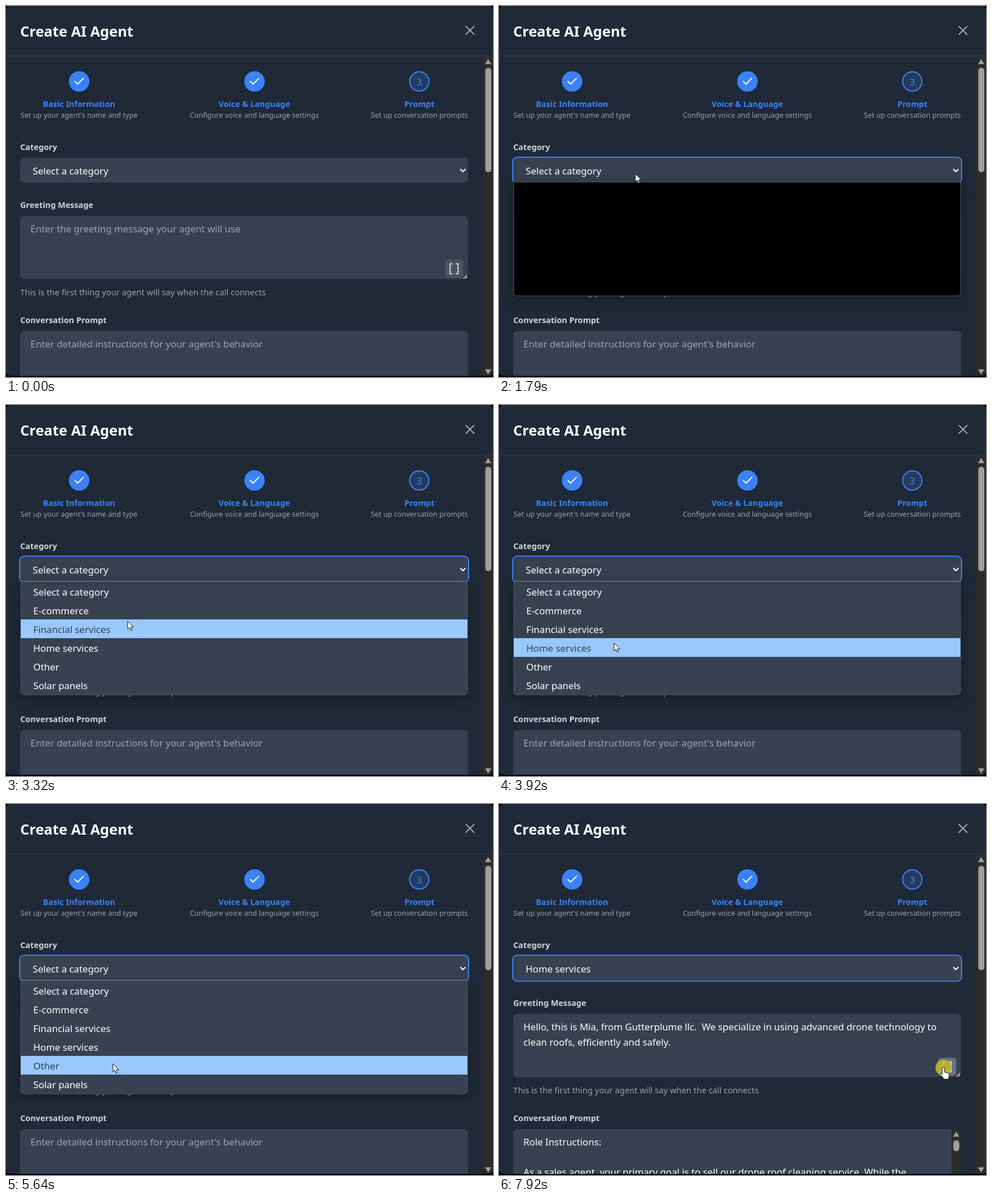
An HTML page that plays this animation: 857 by 654 pixels, repeating every 7990 ms.

```html
<!DOCTYPE html>
<html lang="en">
<head>
<meta charset="utf-8">
<title>Create AI Agent</title>
<style>
  html, body { margin: 0; width: 100%; height: 100%; overflow: hidden; background: #000; }
  svg { display: block; width: 857px; height: 654px; }
  text { font: 16.7px "Noto Sans", sans-serif; fill: #fff; }
  .mid { text-anchor: middle; }
  text.title { font-size: 25.2px; font-weight: 700; }
  text.step { font-size: 14.2px; font-weight: 600; fill: #3b82f6; }
  text.hint { font-size: 12.6px; fill: #9ca3af; }
  text.label { font-size: 14.3px; font-weight: 600; fill: #d1d5db; }
  text.help { font-size: 14.65px; fill: #9ca3af; }
  text.placeholder { fill: #9ca3af; }
  .field { fill: #374151; }
  .track { fill: #2c2c2c; }
  .thumb { fill: #9f9f9f; }
  .line { fill: none; stroke: #fff; stroke-width: 2; stroke-linecap: round; stroke-linejoin: round; }
  .blue { fill: #3b82f6; }
  #list { filter: drop-shadow(0 6px 10px rgba(0, 0, 0, .3)); }
</style>
</head>
<body>
<svg viewBox="0 0 857 654">
  <defs>
    <clipPath id="panel"><rect width="857" height="652" rx="8"/></clipPath>
    <clipPath id="listShape"><path d="M26 311H812V505q0 6-6 6H32q-6 0-6-6z"/></clipPath>
  </defs>

  <g clip-path="url(#panel)">
    <rect width="857" height="654" fill="#1f2937"/>
    <text class="title" x="25" y="54">Create AI Agent</text>
    <path class="line" d="M809.5 36l14 14m0-14l-14 14" style="stroke:#a3aab5"/>
    <rect y="87.5" width="857" height="1" fill="#374151"/>

    <circle class="blue" cx="128.7" cy="133" r="18"/>
    <path class="line" d="M121.3 133l4.7 4.7 10.3-10.3"/>
    <text class="step mid" x="128.5" y="178">Basic Information</text>
    <text class="hint mid" x="128.5" y="197">Set up your agent's name and type</text>

    <circle class="blue" cx="437.3" cy="133" r="18"/>
    <path class="line" d="M429.9 133l4.7 4.7 10.3-10.3"/>
    <text class="step mid" x="437" y="178">Voice &amp; Language</text>
    <text class="hint mid" x="437" y="197">Configure voice and language settings</text>

    <circle cx="727.3" cy="133" r="17" fill="#253b5e" stroke="#3b82f6" stroke-width="2"/>
    <text class="mid" x="727.3" y="139.5" style="fill:#3b82f6">3</text>
    <text class="step mid" x="727.5" y="178">Prompt</text>
    <text class="hint mid" x="727.5" y="197">Set up conversation prompts</text>

    <text class="label" x="25" y="254">Category</text>
    <rect class="field" x="25" y="267.5" width="788" height="44" rx="7"/>
    <rect id="ring" x="24" y="266.5" width="790" height="46" rx="8" fill="none" stroke="#3b82f6" stroke-width="2"/>
    <text id="choice" x="47" y="297"></text>
    <path class="line" d="M800 288l4 4 4-4"/>

    <text class="label" x="25" y="356">Greeting Message</text>
    <rect class="field" x="25" y="370" width="788" height="111.5" rx="7"/>
    <text class="placeholder before" x="43" y="399">Enter the greeting message your agent will use</text>
    <g class="after">
      <text x="43" y="399">Hello, this is Mia, from Gutterplume llc.&#160; We specialize in using advanced drone technology to</text>
      <text x="43" y="426">clean roofs, efficiently and safely.</text>
    </g>
    <rect id="button" x="773" y="447.5" width="31.5" height="31.5" rx="5"/>
    <path class="line" d="M785.5 454.5h-4v17.5h4M791.5 454.5h4v17.5h-4" style="stroke:#d1d5db;stroke-linecap:butt;stroke-linejoin:miter"/>
    <path class="line" d="M805.5 480l5.5-5.5M809 480l2-2" style="stroke:#d0d0d0;stroke-width:1.2"/>
    <text class="help" x="25" y="510">This is the first thing your agent will say when the call connects</text>

    <text class="label" x="25" y="559">Conversation Prompt</text>
    <rect class="field" x="25" y="573" width="788" height="100" rx="7"/>
    <text class="placeholder before" x="43" y="602">Enter detailed instructions for your agent's behavior</text>
    <g class="after">
      <text x="43" y="602">Role Instructions:</text>
      <text x="43" y="655">As a sales agent, your primary goal is to sell our drone roof cleaning service. While the</text>
      <path class="track" d="M796 573h10q7 0 7 7v80h-17z"/>
      <path class="thumb" d="M804.5 577.5l5.5 9h-11z"/>
      <rect class="thumb" x="799.5" y="593" width="10.5" height="19" rx="5"/>
    </g>

    <rect class="track" x="840" y="89" width="17" height="565"/>
    <path class="thumb" d="M848.5 93.5l5.5 9h-11zM848.5 649.5l5.5-9h-11z"/>
    <rect class="thumb" x="843.5" y="109" width="10.5" height="184" rx="5"/>
  </g>

  <g id="list">
    <path id="listBack" d="M26 310.5H812V505q0 6-6 6H32q-6 0-6-6z" stroke="#4b5462"/>
    <g id="listRows">
      <rect id="highlight" x="26" width="786" height="33" fill="#99c8ff" clip-path="url(#listShape)"/>
      <path d="M26 310.5H812" stroke="#858a92"/>
    </g>
  </g>

  <circle id="press" cx="782" cy="465" r="14" fill="#c6b928" opacity=".85"/>
  <g id="pointer" stroke-linejoin="round">
    <path id="arrow" d="M0 0v14.2l3.3-3.1 2.3 5.2 2.4-1-2.3-5h4.6z" fill="#fff" stroke="#111"/>
    <path id="beam" d="M-3-7.5h2L0-6.5 1-7.5H3M0-6.5V6.5M-3 7.5h2L0 6.5 1 7.5H3" fill="none" stroke="#c4c8cf"/>
    <path id="hand" d="M-2 1.5a2 2 0 0 1 4 0v6l6 1.5q2 .6 2 2.5v3q0 2-1 3.5v2H0v-1.500l-5-6q-1-2 .5-2.500t2.500 1.500z" fill="#fff" stroke="#111"/>
  </g>
</svg>

<script>
const LOOP = 7990;
const OPEN = 1790, FILLED = 1850, CHOSEN = 6060, PRESSED = 7860;
const ROW_TOP = 312, ROW_HEIGHT = 33;
const options = ["Select a category", "E-commerce", "Financial services", "Home services", "Other", "Solar panels"];

// Pointer path: time, x, y
const path = [
  [390, 718, 355], [520, 690, 450], [720, 590, 575], [900, 440, 612], [1120, 277, 579],
  [1190, 262, 540], [1500, 236, 400], [1790, 240, 296], [2450, 240, 296], [2700, 236, 316],
  [3190, 222, 368], [3260, 218, 378], [3320, 214, 381], [3990, 201, 424], [5060, 201, 424],
  [5120, 192, 452], [5180, 189, 482], [5580, 189, 482], [5640, 188, 458], [5850, 189, 430],
  [6060, 189, 430], [6380, 212, 432], [6580, 274, 435], [6720, 274, 435], [6850, 330, 462],
  [7050, 500, 494], [7250, 690, 490], [7390, 782, 465]
];

// Highlighted option: time, row
const highlights = [[0, 0], [2950, 1], [3260, 2], [3790, 3], [5180, 5], [5640, 4], [5800, 3]];

const $ = id => document.getElementById(id);
const show = (element, visible) => { element.style.display = visible ? "" : "none"; };
const showAll = (selector, visible) => document.querySelectorAll(selector).forEach(e => show(e, visible));
const inside = (x, y, left, top, right, bottom) => x >= left && x <= right && y >= top && y <= bottom;

const rowTexts = options.map((name, i) => {
  const text = document.createElementNS($("list").namespaceURI, "text");
  text.textContent = name;
  text.setAttribute("x", 48);
  text.setAttribute("y", ROW_TOP + ROW_HEIGHT * i + 23.5);
  return $("listRows").appendChild(text);
});

function pointerAt(t) {
  const next = path.findIndex(key => key[0] > t);
  if (next < 0) return path[path.length - 1].slice(1);
  const [t0, x0, y0] = path[Math.max(next - 1, 0)];
  const [t1, x1, y1] = path[next];
  const k = t1 > t0 ? (t - t0) / (t1 - t0) : 0;
  return [x0 + (x1 - x0) * k, y0 + (y1 - y0) * k];
}

function drawList(t) {
  show($("list"), t >= OPEN && t < CHOSEN);
  show($("listRows"), t >= FILLED);
  $("listBack").setAttribute("fill", t < FILLED ? "#000" : "#374151");
  const active = highlights.filter(h => h[0] <= t).pop()[1];
  $("highlight").setAttribute("y", ROW_TOP + ROW_HEIGHT * active);
  rowTexts.forEach((text, i) => { text.style.fill = i === active ? "#374151" : "#fff"; });
}

function drawPointer(t) {
  const [x, y] = pointerAt(t);
  const listOpen = t >= OPEN && t < CHOSEN;
  const onButton = inside(x, y, 773, 447, 805, 479);
  const onText = !listOpen && !onButton &&
    (inside(x, y, 25, 370, 813, 481) || inside(x, y, 25, 573, 813, 652));
  show($("pointer"), t >= path[0][0]);
  $("pointer").setAttribute("transform", `translate(${x} ${y})`);
  show($("hand"), onButton);
  show($("beam"), onText);
  show($("arrow"), !onButton && !onText);
  $("button").setAttribute("fill", onButton ? "#6b7280" : "#4b5563");
  show($("press"), t >= PRESSED);
}

function draw() {
  const t = performance.now() % LOOP;
  const chosen = t >= CHOSEN;
  show($("ring"), t >= OPEN);
  $("choice").textContent = options[chosen ? 3 : 0];
  showAll(".before", !chosen);
  showAll(".after", chosen);
  drawList(t);
  drawPointer(t);
  requestAnimationFrame(draw);
}
draw();
</script>
</body>
</html>
```
